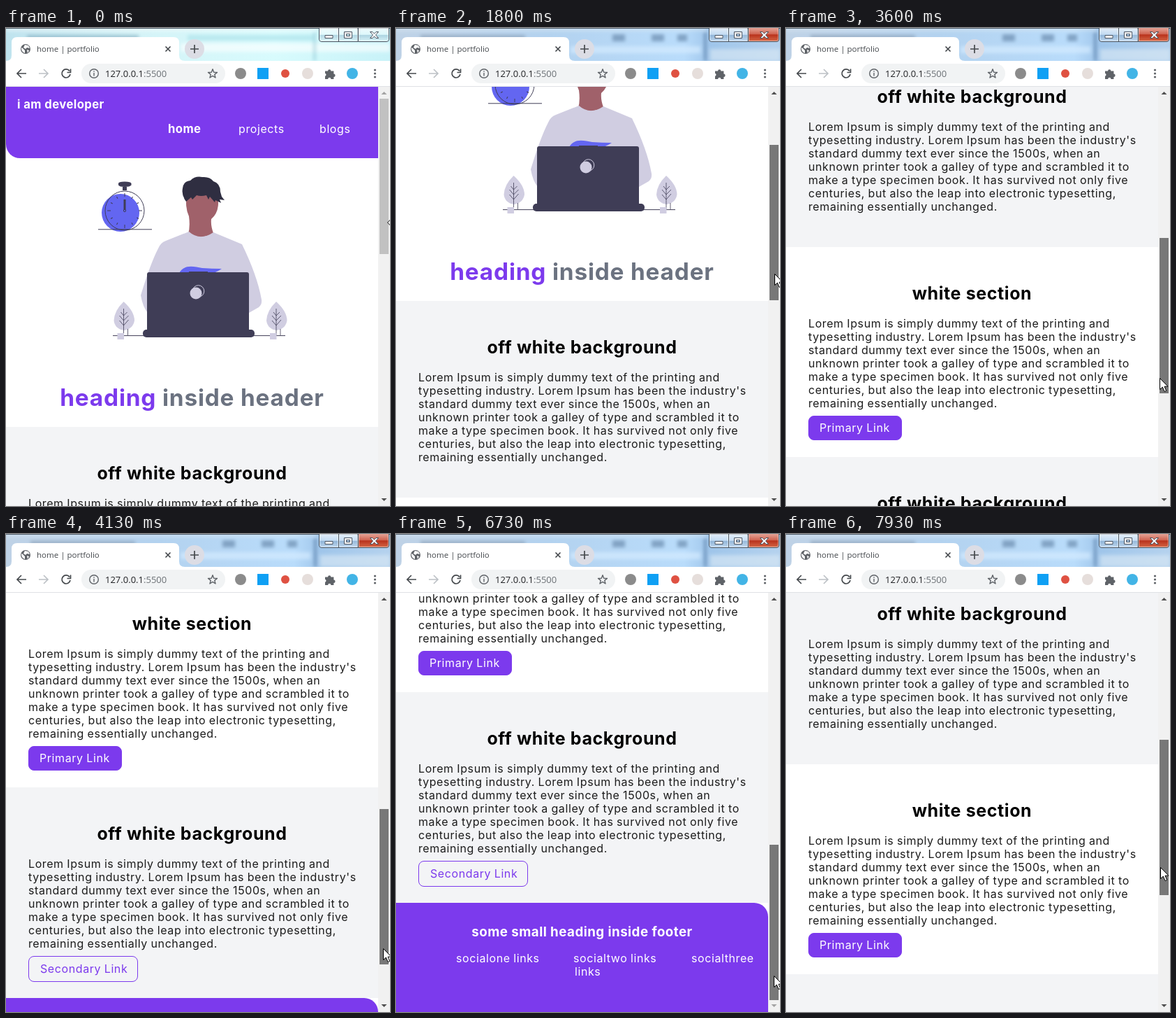
These frames come from a looping animation (550 by 683 pixels, 8 s). An HTML page:

```html
<!DOCTYPE html>
<html lang="en">
<head>
<meta charset="utf-8">
<title>home | portfolio</title>
<style>
  html, body { margin: 0; width: 100%; height: 100%; overflow: hidden; background: #fff; }
  #stage { position: relative; width: 550px; height: 683px; overflow: hidden; background: #fff; }
  #stage svg { position: absolute; left: 0; top: 0; }
  #view { position: absolute; left: 0; top: 84px; width: 533px; height: 599px; overflow: hidden; }
  #page { position: absolute; left: 0; top: -84px; width: 533px; height: 1608px;
    font: 16px/19px Inter, "Open Sans", sans-serif; letter-spacing: .037em; word-spacing: -.03em; color: #1c1c1c; white-space: nowrap; }
  #page > *, section > * { position: absolute; margin: 0; }
  b, h1, h2, h3 { font-weight: 700; letter-spacing: .024em; word-spacing: 0; color: #000; }
  b { font-size: 16.7px; }
  h1, h2, h3 { left: 0; width: 533px; text-align: center; }
  h1 { top: 508px; font-size: 33.4px; line-height: 40px; color: #6b7280; }
  h1 span { color: #7c3aed; }
  h2 { top: 52px; font-size: 25px; line-height: 29px; }
  h3 { top: 1483px; font-size: 18.75px; line-height: 22px; color: #fff; }
  section { left: 0; width: 533px; }
  section p { left: 32px; top: 100px; }
  .off { background: #f3f4f6; }
  .bar { left: 0; width: 533px; background: #7c3aed; }
  .light { color: #fff; }
  .btn { left: 32px; top: 241px; box-sizing: border-box; border: 1px solid #7c3aed; border-radius: 8px; padding-left: 15px; color: #7c3aed; }
  .primary { width: 134px; height: 35px; line-height: 33px; background: #7c3aed; color: #fff; }
  .secondary { width: 157px; height: 37px; line-height: 35px; padding-left: 16px; }
</style>
</head>
<body>
<div id="stage">
  <div id="view"><div id="page">
    <div class="bar" style="top:84px;height:102px;border-bottom-left-radius:20px"></div>
    <b class="light" style="left:16px;top:100px">i am developer</b>
    <b class="light" style="left:232px;top:135px">home</b>
    <span class="light" style="left:333px;top:135px">projects</span>
    <span class="light" style="left:449px;top:135px">blogs</span>

    <svg id="art" width="533" height="500" fill="none" stroke="#3f3d56">
      <g id="watch">
        <circle cx="164" cy="264" r="27" fill="#6366f1" stroke="none"/>
        <circle cx="170" cy="261" r="28"/>
        <path d="M132 287.8H209"/>
        <path d="M167 226h6v6h-6zM161 222q0-2.500 9-2.500t9.500 2.500v2.500q-2 2.500-9.500 2.500t-9-2.500z" fill="#3f3d56" stroke="none"/>
        <path d="M170 245V260" stroke-width="3"/>
        <circle cx="170" cy="261" r="1.600" fill="#6366f1"/>
        <g id="ticks"></g>
      </g>
      <g stroke="none">
        <path d="M259 239Q256 256 262 269Q264 284 261 294Q278 304 297 293Q293 282 294 273Q305 264 304 246Q300 232 280 231Z" fill="#a0616a"/>
        <path d="M258 248Q251 239 253 229Q254 219 264 218Q271 211 281 213Q292 212 297 219Q307 222 307 234L309 241L313 246L306 245L308 250L300 246L299 249L292 241L290 245L287 239Q279 241 273 239L267 245L265 242Z" fill="#2f2e41"/>
        <path d="M262 291Q278 305 297 292L338 309Q360 354 366 388Q367 395 362 399L348 407H203Q196 399 193 382Q207 336 218 315Q221 307 229 304Z" fill="#d0cde1"/>
        <path d="M248 350C256 337 269 341 281 343Q295 344 309 344Q300 350 290 352H248Z" fill="#6366f1"/>
        <path d="M262 348h27v3h-27z" fill="#3f3d56"/>
      </g>
      <path d="M153 439.600H400"/>
      <g id="plant">
        <path d="M168.500 391Q184 405 184 418Q182 430 169 432Q156 430 154.500 418Q155 404 168.500 391Z" fill="#d0cde1" stroke="none"/>
        <path d="M168.500 401V439M168.500 411l5-5M168.500 411l-4-5M168.500 418l7-7M168.500 418l-6-7M168.500 425l7-8M168.500 425l-6-7M174.500 430V439" stroke-width=".8"/>
        <path d="M159.500 436h9.500v9h-9.500z" fill="#d0cde1" stroke="none"/>
      </g>
      <use href="#plant" x="218.500"/>
      <g stroke="none">
        <rect x="202" y="349" width="146" height="90" rx="3" fill="#3f3d56"/>
        <rect x="196" y="431" width="160" height="11" rx="5" fill="#3f3d56"/>
        <circle cx="272" cy="379" r="8.500" fill="#d0cde1"/>
      </g>
      <circle cx="275.500" cy="376" r="8.300" stroke="#d0cde1"/>
    </svg>

    <h1><span>heading</span> inside header</h1>
    <section class="off" style="top:570px;height:281px"><h2>off white background</h2><p></p></section>
    <section style="top:851px;height:300px"><h2>white section</h2><p></p><span class="btn primary">Primary Link</span></section>
    <section class="off" style="top:1151px;height:301px"><h2>off white background</h2><p></p><span class="btn secondary">Secondary Link</span></section>
    <div class="bar" style="top:1452px;height:156px;border-top-right-radius:20px"></div>
    <h3>some small heading inside footer</h3>
    <span class="light" style="left:86px;top:1522px">socialone links</span>
    <span class="light" style="left:254px;top:1522px">socialtwo links</span>
    <span class="light" style="left:423px;top:1522px">socialthree</span>
    <span class="light" style="left:256px;top:1541px">links</span>
  </div></div>

  <svg width="550" height="683" fill="none">
    <defs>
      <linearGradient id="pale"><stop stop-color="#bfe3ee"/><stop offset=".35" stop-color="#d4f3f7"/><stop offset=".7" stop-color="#d8fbfd"/><stop offset="1" stop-color="#c8f2f8"/></linearGradient>
      <linearGradient id="blue"><stop stop-color="#bfd2e6"/><stop offset=".4" stop-color="#b3d2ef"/><stop offset=".75" stop-color="#b9dcfb"/><stop offset=".82" stop-color="#9fc5ea"/><stop offset="1" stop-color="#b5d2ee"/></linearGradient>
      <linearGradient id="red" x2="0" y2="1"><stop stop-color="#e5a396"/><stop offset=".45" stop-color="#cf6350"/><stop offset=".5" stop-color="#b9321c"/><stop offset="1" stop-color="#d66a48"/></linearGradient>
      <linearGradient id="glass" x2="0" y2="1"><stop stop-color="#fff" stop-opacity=".7"/><stop offset=".48" stop-color="#fff" stop-opacity=".35"/><stop offset=".52" stop-color="#6d8fae" stop-opacity=".3"/><stop offset="1" stop-color="#fff" stop-opacity=".4"/></linearGradient>
      <filter id="blur" x="-20%" y="-50%" width="140%" height="200%"><feGaussianBlur stdDeviation="2.500"/></filter>
      <clipPath id="strip"><path d="M0 0H550V47H0z"/></clipPath>
    </defs>

    <g id="idle" clip-path="url(#strip)">
      <path d="M0 0H550V47H0z" fill="url(#pale)"/>
      <g filter="url(#blur)">
        <path d="M30 10H190V17H30z" fill="#7fa9bc" opacity=".6"/>
        <path d="M0 0H445V4H0zM250 22H550V34H250z" fill="#fff" opacity=".6"/>
        <path d="M260 10H440V18H260z" fill="#a5dfe8" opacity=".6"/>
        <path d="M440 6h4v41h-4z" fill="#90c8d5" opacity=".6"/>
      </g>
    </g>
    <g id="focus" clip-path="url(#strip)">
      <path d="M0 0H550V47H0z" fill="url(#blue)"/>
      <g filter="url(#blur)">
        <path d="M35 10H185V16H35z" fill="#8498ad" opacity=".6"/>
        <path d="M0 0H445V4H0z" fill="#dceaf6" opacity=".7"/>
        <path d="M310 9h18v10h-18zM366 9h18v10h-18zM403 9h14v10h-14z" fill="#6c8cae" opacity=".7"/>
        <path d="M250 26H436V36H250z" fill="#d4ebff" opacity=".7"/>
        <path d="M441 6h4v41h-4z" fill="#587ea8" opacity=".7"/>
        <path d="M450 30H550V47H450z" fill="#d5e5f4" opacity=".7"/>
      </g>
    </g>
    <path d="M0 .5H550" stroke="#55616d"/>
    <g stroke="#46525f">
      <path d="M448.500 0V16Q448.500 19.500 452 19.500H504V0M476.500 0V19.500" fill="url(#glass)"/>
      <path id="shut" d="M504.500 0V19.500H545Q548.500 19.500 548.500 16V0" fill="url(#glass)"/>
      <path d="M449.500 1.500V16Q450 18.500 452 18.500H475.500V1.500M477.500 1.500V18.500H503.500V1.500M505.500 1.500V18.500H545Q547.500 18.500 547.500 16V1.500" stroke="#fff" stroke-opacity=".5"/>
      <g fill="#fff" stroke="#4a5360">
        <path d="M457 10.500h11v4h-11z"/>
        <path d="M484.500 5.500h11v9h-11zM487.500 8.500h5v3h-5z" fill-rule="evenodd"/>
        <path d="M521.500 5.500h3.500l2.500 2.700 2.500-2.700h3.500l-4 4.500 4 4.500h-3.500l-2.500-2.700-2.500 2.700h-3.500l4-4.500z"/>
      </g>
    </g>

    <path d="M0 47Q8 47 8 39V21Q8 13 16 13H240Q248 13 248 21V39Q248 47 256 47H550V83H0Z" fill="#fff"/>
    <path d="M0 83.500H550" stroke="#dfe1e5"/>
    <circle cx="270" cy="30" r="14" fill="#dcdde5"/>
    <rect x="108" y="51" width="206" height="28" rx="14" fill="#f1f3f4"/>
    <g font-family="'Open Sans', 'Noto Sans', sans-serif">
      <text x="44" y="34" font-size="11.500" fill="#45494d">home | portfolio</text>
      <text x="142" y="70" font-size="13" fill="#202124">127.0.0.1<tspan fill="#6b7075">:5500</tspan></text>
    </g>
    <circle cx="28" cy="30" r="7" fill="#5f6368"/>
    <path d="M23 28l4 4v4q-5-2-5-7zM27 24l5 1 2 4-4-1-2 2-3-2zM30 31l3 1-2 4z" fill="#fff"/>
    <g stroke="#45494d" stroke-width="1.700">
      <path d="M228.500 26.500l7 7M235.500 26.500l-7 7M264 30h12M270 24v12"/>
      <path d="M29 65H16.500M22 59l-6 6 6 6M91 61.500A6 6 0 1 0 92 66M92.500 58.500V63.500H87.500"/>
      <path d="M47 65H59.500M54 59l6 6-6 6" stroke="#bdc1c6"/>
      <g stroke="#5f6368" stroke-width="1.400">
        <circle cx="126" cy="65" r="6.300"/>
        <path d="M126 64v4.500M126 61.300v1.400"/>
        <path id="star" stroke-linejoin="round"/>
      </g>
    </g>
    <circle cx="336" cy="65" r="8" fill="#8b8b8b"/>
    <path d="M360 57h16v16h-16z" fill="#0fa0f4"/>
    <circle cx="400" cy="65" r="6" fill="#df5142"/>
    <circle cx="432" cy="65" r="8" fill="#e6dedb"/>
    <circle cx="496" cy="65" r="8" fill="#42b4e6"/>
    <g fill="#5f6368">
      <path d="M457 61.500h4a2.200 2.200 0 1 1 4.400 0h4v4a2.200 2.200 0 1 1 0 4.400v3h-4a2 2 0 0 0-4.200 0h-4.200v-4a2.200 2.200 0 0 0 0-4.200z"/>
      <circle cx="528.500" cy="60" r="1.600"/><circle cx="528.500" cy="65" r="1.600"/><circle cx="528.500" cy="70" r="1.600"/>
    </g>

    <path d="M533 84H550V683H533z" fill="#f1f1f1"/>
    <path id="up" d="M537.500 95l4-4 4 4z"/>
    <path id="down" d="M537.500 672l4 4 4-4z"/>
    <rect id="thumb" x="535" width="13" height="222"/>
    <path id="resize" d="M551 273.500L546.500 278L551 282.500" fill="#fff" stroke="#000"/>
    <path id="arrow" d="M0 0V16L3.800 12.600L6.600 19L9.200 17.900L6.500 11.700H11.500Z" fill="#fff" stroke="#000"/>
  </svg>
</div>
<script>
  const $ = id => document.getElementById(id);
  const LOOP = 8000, STEP = 1000 / 15;
  const SCROLL_END = 925;

  const lorem = ["Lorem Ipsum is simply dummy text of the printing and",
    "typesetting industry. Lorem Ipsum has been the industry's",
    "standard dummy text ever since the 1500s, when an",
    "unknown printer took a galley of type and scrambled it to",
    "make a type specimen book. It has survived not only five",
    "centuries, but also the leap into electronic typesetting,",
    "remaining essentially unchanged."].join("<br>");
  document.querySelectorAll("section p").forEach(p => p.innerHTML = lorem);

  // Watch ticks and bookmark star
  $("ticks").innerHTML = Array.from({ length: 12 }, (_, i) =>
    `<path d="M170 ${i % 3 ? 238 : 236}V241" transform="rotate(${i * 30} 170 261)"/>`).join("");
  $("star").setAttribute("d", "M" + Array.from({ length: 10 }, (_, i) => {
    const r = i % 2 ? 2.9 : 6.8, a = i * Math.PI / 5;
    return (296 + r * Math.sin(a)).toFixed(1) + " " + (65.5 - r * Math.cos(a)).toFixed(1);
  }).join("L") + "Z");

  // [step, scroll]
  const scrollKeys = [[0, 0], [15, 0], [27, 180], [31, 180], [38, 307], [40, 338], [44, 338],
    [47, 372], [48, 372], [54, 538], [61, 780], [66, 827], [74, 827], [76, 835], [87, 835],
    [88, 840], [91, 840], [96, 925], [104, 925], [111, 705], [113, 705], [119, 522]];
  // [step, pointer x, distance below the thumb's top]
  const pointerKeys = [[8, 541, 183], [15, 541, 183], [27, 542, 184], [31, 542, 184],
    [38, 535, 192], [48, 535, 192], [54, 535, 200], [61, 538, 200], [66, 549, 196],
    [101, 541, 187], [104, 541, 187], [111, 536, 183], [113, 536, 183], [119, 536, 182]];

  function at(keys, k, col) {
    let i = keys.findIndex(key => key[0] >= k);
    if (i < 0) i = keys.length - 1;
    if (i === 0) return keys[0][col];
    const a = keys[i - 1], b = keys[i];
    const p = Math.min(1, (k - a[0]) / (b[0] - a[0]));
    return Math.round(a[col] + (b[col] - a[col]) * p);
  }

  const show = (id, on) => $(id).style.display = on ? "" : "none";
  const fill = (id, color) => $(id).setAttribute("fill", color);

  function draw() {
    const k = Math.floor((performance.now() % LOOP + 5) / STEP) % 120;
    const scroll = at(scrollKeys, k, 1);
    const thumbY = 101 + Math.floor(scroll * 343 / SCROLL_END);
    const focused = k >= 16;

    $("page").style.transform = `translateY(${-scroll}px)`;
    $("thumb").setAttribute("y", thumbY);
    fill("thumb", focused ? "#787878" : k >= 8 ? "#a8a8a8" : "#c1c1c1");
    fill("up", scroll > 0 ? "#505050" : "#a3a3a3");
    fill("down", scroll < SCROLL_END ? "#505050" : "#a3a3a3");
    fill("shut", focused ? "url(#red)" : "url(#glass)");
    show("idle", !focused);
    show("focus", focused);
    show("resize", k < 2);
    show("arrow", (k >= 8 && k <= 66) || k >= 101);
    const x = at(pointerKeys, k, 1) + .5, y = thumbY + at(pointerKeys, k, 2) + .5;
    $("arrow").setAttribute("transform", `translate(${x} ${y})`);
    requestAnimationFrame(draw);
  }
  draw();
</script>
</body>
</html>
```
